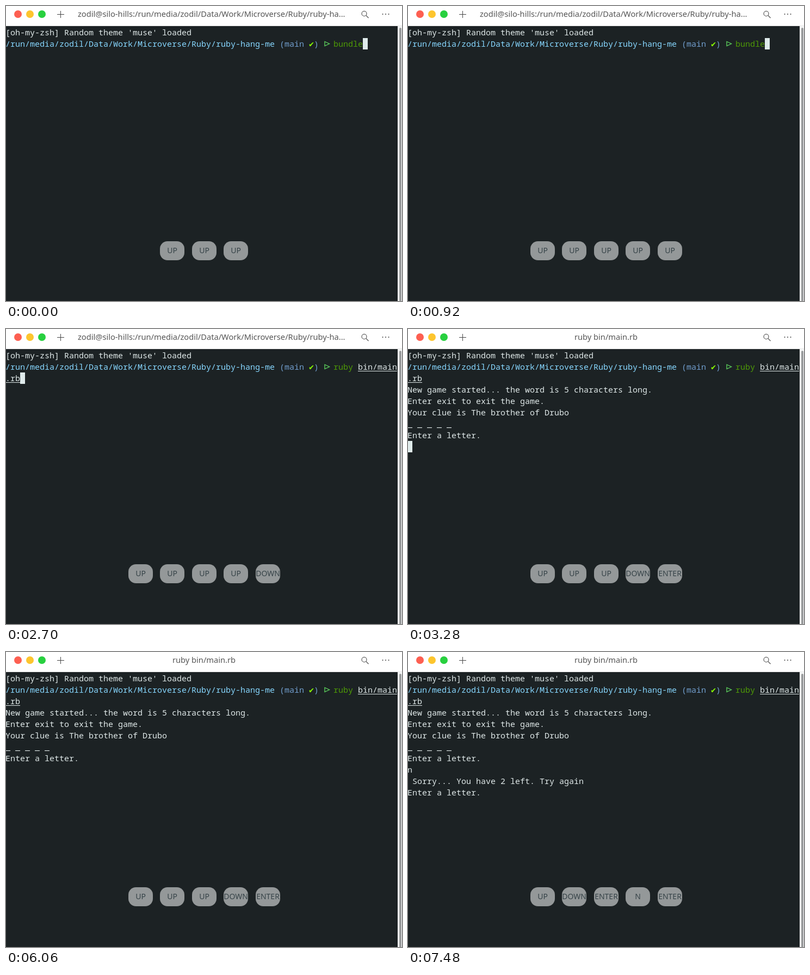
Animation, 728 px wide and 543 px high, one loop 8 s. Source, as an HTML page with a canvas:

```html
<!DOCTYPE html>
<html lang="en">
<head>
<meta charset="utf-8">
<title>Terminal</title>
<style>
html, body { margin: 0; width: 728px; height: 543px; overflow: hidden; background: #1c2224; }
canvas { display: block; }
</style>
</head>
<body>
<canvas id="stage" width="728" height="543"></canvas>
<script>
const ctx = document.getElementById('stage').getContext('2d');
const LOOP = 8000, COLS = 80, CELL = 9, ROW = 21, LEFT = -1, TOP = 38;
const COLOR = {
  bg: '#1c2224', text: '#dfe8e8', path: '#87d7ff', git: '#729fcf', clean: '#87ff00',
  prompt: '#5fd75f', command: '#4e9a06', cursor: '#dfebeb', title: '#555555', icon: '#454545'
};
const SANS = '"Noto Sans", sans-serif';
const MONO = '15px "Noto Sans Mono", monospace';

// Latest entry whose start time has passed.
const at = (track, t) => track.filter(([start]) => start <= t).pop()[1];

const commands = [
  [0, 'bundle'], [300, 'bundle install'], [920, 'bundle'], [1500, 'ruby bin/main.rb'],
  [2000, 'bundle exec rubocop'], [2620, 'ruby bin/main.rb']
];
const keys = [
  [0, 'UP UP UP'], [220, 'UP UP UP UP'], [920, 'UP UP UP UP UP'],
  [2540, 'UP UP UP UP DOWN'], [3120, 'UP UP UP DOWN ENTER'],
  [6560, 'UP UP DOWN ENTER N'], [6920, 'UP DOWN ENTER N ENTER']
];
const titles = [
  [0, 'zodil@silo-hills:/run/media/zodil/Data/Work/Microverse/Ruby/ruby-ha...'],
  [3200, 'ruby bin/main.rb']
];
const output = [
  [3280, 3, 'New game started... the word is 5 characters long.'],
  [3280, 4, 'Enter exit to exit the game.'],
  [3280, 5, 'Your clue is The brother of Drubo'],
  [3280, 6, '_ _ _ _ _'],
  [3280, 7, 'Enter a letter.'],
  [6610, 8, 'n'],
  [6960, 9, ' Sorry... You have 2 left. Try again'],
  [6960, 10, 'Enter a letter.']
];
// Cursor cell as [column, row]; null while blinked off.
const cursor = [
  [3200, [0, 3]], [3280, [0, 8]], [3670, null], [4270, [0, 8]], [4870, null],
  [5470, [0, 8]], [6060, null], [6610, [1, 8]], [6960, [0, 11]], [7480, null]
];

function rect(x, y, w, h, color) {
  ctx.fillStyle = color;
  ctx.fillRect(x, y, w, h);
}

function disc(x, y, r, color) {
  ctx.fillStyle = color;
  ctx.beginPath();
  ctx.arc(x, y, r, 0, Math.PI * 2);
  ctx.fill();
}

function roundBox(x, y, w, h, r, color) {
  ctx.fillStyle = color;
  ctx.beginPath();
  ctx.roundRect(x, y, w, h, r);
  ctx.fill();
}

function label(text, x, y, size, color, align = 'center') {
  ctx.font = `${size}px ${SANS}`;
  ctx.textAlign = align;
  ctx.fillStyle = color;
  ctx.fillText(text, x, y);
}

const cellX = i => LEFT + (i % COLS) * CELL;
const rowY = r => TOP + r * ROW;

// Writes text from a cell index, wrapping at the last column; returns the next index.
function write(text, index, color, underline = false) {
  ctx.font = MONO;
  ctx.textAlign = 'left';
  for (const ch of text) {
    const x = cellX(index), base = rowY(Math.floor(index / COLS)) + 16;
    ctx.fillStyle = color;
    if (ch === '▷') {
      drawPromptMark(x, base);
    } else if (ch === '✔') {
      ctx.font = '15px "DejaVu Sans Mono", monospace';
      ctx.fillText(ch, x, base);
      ctx.font = MONO;
    } else {
      ctx.fillText(ch, x, base);
    }
    if (underline) rect(x, base + 2, CELL, 1, color);
    index++;
  }
  return index;
}

function drawPromptMark(x, base) {
  ctx.strokeStyle = COLOR.prompt;
  ctx.lineWidth = 1.3;
  ctx.beginPath();
  ctx.moveTo(x + 2, base - 9.5);
  ctx.lineTo(x + 10.5, base - 5.5);
  ctx.lineTo(x + 2, base - 1.5);
  ctx.closePath();
  ctx.stroke();
}

function drawCursor(col, row) {
  rect(LEFT + col * CELL, rowY(row), CELL, ROW, COLOR.cursor);
}

function drawTitleBar(t) {
  rect(0, 0, 728, 37, '#ffffff');
  rect(0, 36, 728, 1, '#e4e5e5');
  ['#fd5f51', '#fdc52e', '#28d03f'].forEach((c, i) => disc(22 + i * 22, 15, 7, c));

  rect(94, 15, 13, 1, COLOR.icon);
  rect(100, 9, 1, 13, COLOR.icon);

  const title = at(titles, t);
  if (t < 3200) label(title, 623.5, 20, 14.667, COLOR.title, 'right');
  else label(title, 364, 20, 14.667, COLOR.title);

  ctx.strokeStyle = COLOR.icon;
  ctx.lineWidth = 1.1;
  ctx.beginPath();
  ctx.arc(658.5, 14, 4.5, 0, Math.PI * 2);
  ctx.moveTo(661.8, 17.3);
  ctx.lineTo(666.5, 22);
  ctx.stroke();
  [692.5, 698, 703.5].forEach(x => disc(x, 15, 1, COLOR.icon));
}

function drawTerminal(t) {
  rect(0, 37, 728, 506, COLOR.bg);
  write("[oh-my-zsh] Random theme 'muse' loaded", 0, COLOR.text);

  let i = write('/run/media/zodil/Data/Work/Microverse/Ruby/ruby-hang-me', COLS, COLOR.path);
  i = write(' (main ', i, COLOR.git);
  i = write('✔', i, COLOR.clean);
  i = write(') ', i, COLOR.git);
  i = write('▷ ', i, COLOR.prompt);

  const [program, ...args] = at(commands, t).split(' ');
  i = write(program, i, COLOR.command);
  for (const arg of args) i = write(arg, i + 1, COLOR.text, arg.includes('/'));

  for (const [start, row, text] of output) {
    if (t >= start) write(text, row * COLS, COLOR.text);
  }

  const spot = t < 3200 ? [i % COLS, Math.floor(i / COLS)] : at(cursor, t);
  if (spot) drawCursor(...spot);
}

function drawScrollbar() {
  rect(720, 37, 8, 506, '#f6f7f7');
  roundBox(723, 40, 4, 510, 2, '#9b9d9e');
}

function drawKeys(t) {
  const names = at(keys, t).split(' ');
  names.forEach((name, i) => {
    const center = 364.4 + (i - (names.length - 1) / 2) * 58.5;
    roundBox(Math.round(center - 22.5), 433, 45, 35, 14, '#949899');
    label(name, Math.round(center - 22.5) + 22.5, 455, 14, '#364348');
  });
}

function frame() {
  const t = performance.now() % LOOP;
  drawTerminal(t);
  drawTitleBar(t);
  drawScrollbar();
  drawKeys(t);
  requestAnimationFrame(frame);
}
frame();
</script>
</body>
</html>
```
